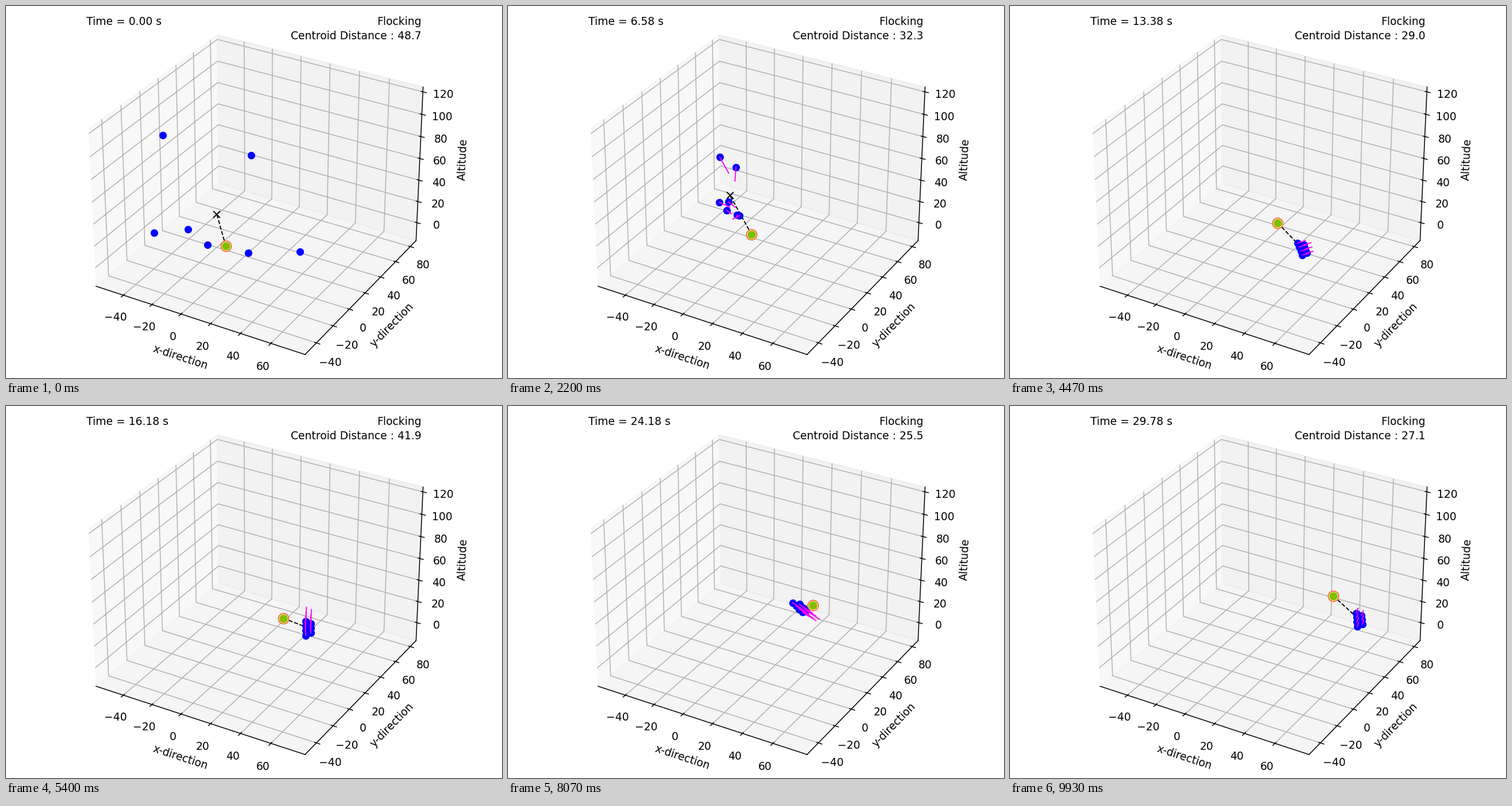
Animation, 864 px wide and 648 px high, one loop 9.99 s. Source, as a matplotlib script:

```python
import numpy as np
import matplotlib.pyplot as plt
from matplotlib.animation import FuncAnimation

W, H, DPI = 864, 648, 135
FRAMES, LOOP = 150, 9990

# Where the agents start, in pixels
START = np.array([(273.4, 225), (427, 260), (258.4, 394.5), (317, 388.5),
                  (351.4, 416), (422, 430), (512, 427.5)])
COUNT = len(START)

# Key points of the flock's center: time, x, y, speed x, speed y, distance
TIMES, *PATH = np.array([
    (0, 367.2, 362.6, 0, 0, 48.7),
    (6.58, 386.6, 329.8, 5.5, 12.5, 32.3),
    (10.58, 463.2, 412.9, 21, 9, 16.9),
    (16.18, 526.7, 386.5, 0, -24, 41.9),
    (18.98, 510, 325.4, -7.5, -12.5, 36.3),
    (24.18, 508.6, 350.6, 23, 15, 25.5),
    (29.78, 608.4, 372, 3, -8, 27.1),
]).T
X, Y, VX, VY, GAP = PATH
GAP_RATE = np.gradient(GAP, TIMES)


def hermite(t, values, rates):
    """Cubic through the key values with the given slopes."""
    k = np.clip(np.searchsorted(TIMES, t, side="right") - 1, 0, len(TIMES) - 2)
    span = TIMES[k + 1] - TIMES[k]
    u = (t - TIMES[k]) / span
    ease = u * u * (3 - 2 * u)
    return (values[k] * (1 - ease) + values[k + 1] * ease
            + span * u * (1 - u) * (rates[k] * (1 - u) - rates[k + 1] * u))


def smooth(u):
    u = np.clip(u, 0, 1)
    return u * u * (3 - 2 * u)


def center_at(t):
    return np.array([hermite(t, X, VX), hermite(t, Y, VY)])


def goal_at(t):
    return np.array([382.9 + 6.39 * t - 0.011 * t**2,
                     418 - 3.022 * t + 0.0034 * t**2])


def formation(t):
    """Zigzag column that leans and flattens as the flock moves sideways."""
    drift = np.interp(t, TIMES, VX)
    column = np.linspace(-12, 13, COUNT)
    sides = 4.5 * (-1.0) ** np.arange(1, COUNT + 1)
    return np.column_stack([sides + 0.03 * drift * column,
                            column * (1 - 0.015 * abs(drift))])


def agents_at(t):
    gather = smooth(t / np.array([8.5, 12.2]))
    scatter = START - center_at(0)
    return center_at(t) + scatter * (1 - gather) + formation(t) * gather


def velocity_at(t, h=0.05):
    return (agents_at(t + h) - agents_at(t - h)) / (2 * h)


fig = plt.figure(figsize=(W / DPI, H / DPI), dpi=DPI)

# Room with its axes
room = fig.add_axes([0, 0, 1, 1], projection="3d")
half = 70.72
room.set_xlim(11.4 - half, 11.4 + half)
room.set_ylim(17.4 - half, 17.4 + half)
room.set_zlim(53.55 - half, 53.55 + half)
room.set_xticks(range(-40, 61, 20))
room.set_yticks(range(-40, 81, 20))
room.set_zticks(range(0, 121, 20))
room.set_xlabel("x-direction")
room.set_ylabel("y-direction")
room.set_zlabel("Altitude")

# Flat layer in pixels for everything that moves
layer = fig.add_axes([0, 0, 1, 1])
layer.set_axis_off()
layer.set_xlim(0, W)
layer.set_ylim(H, 0)

clock = layer.text(140.4, 33.2, "")
layer.text(723.6, 33.2, "Flocking", ha="right")
gap_text = layer.text(723.6, 58.3, "", ha="right")

tether, = layer.plot([], [], "k--", lw=1)
cross, = layer.plot([], [], "kx", ms=6)
dots, = layer.plot([], [], "o", color="#0000ff", ms=6)
arrows = [layer.plot([], [], color="#ff00ff", lw=1)[0] for _ in START]
ring, = layer.plot([], [], "o", ms=9.7, mfc="#ffff80", mec="#ff6a4d", mew=1)
goal, = layer.plot([], [], "o", color="#7fbf00", ms=6.6)


def update(i):
    t = max(0, 0.2 * i - 0.02)
    agents, center, aim = agents_at(t), center_at(t), goal_at(t)

    clock.set_text(f"Time = {t:.2f} s")
    gap_text.set_text(f"Centroid Distance : {hermite(t, GAP, GAP_RATE):.1f}")
    tether.set_data(*zip(aim, center))
    cross.set_data(*center[:, None])
    dots.set_data(*agents.T)
    for line, tail, tip in zip(arrows, agents, agents + velocity_at(t)):
        line.set_data(*zip(tail, tip))
        line.set_visible(t > 0)
    for mark in (ring, goal):
        mark.set_data(*aim[:, None])
    return [clock, gap_text, tether, cross, dots, *arrows, ring, goal]


anim = FuncAnimation(fig, update, frames=FRAMES, interval=LOOP / FRAMES,
                     init_func=lambda: update(0), repeat=True, repeat_delay=0)
plt.show()
```
